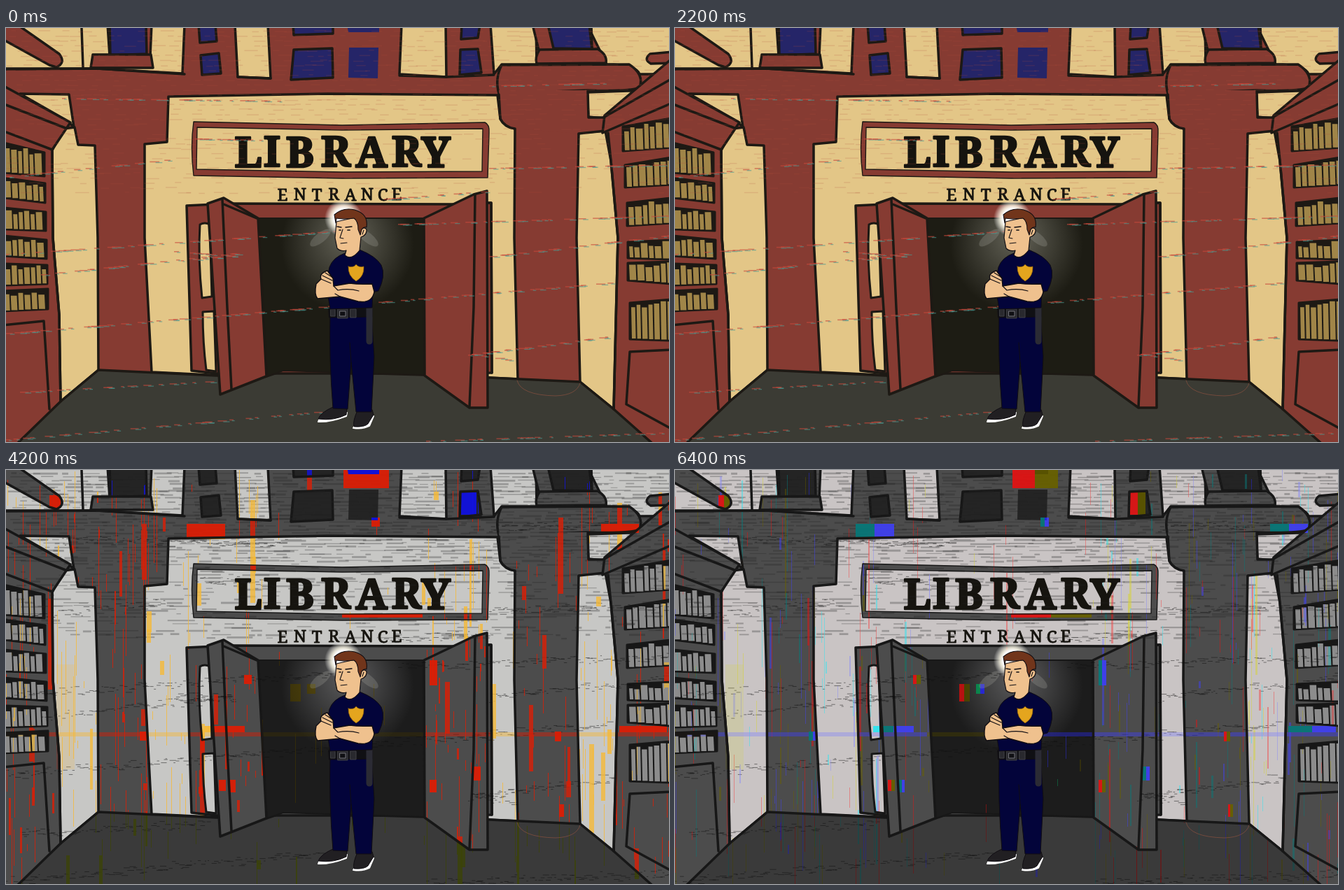
These frames come from a looping animation (947 by 592 pixels, 6.6 s). An HTML page with a canvas:

```html
<!DOCTYPE html>
<html lang="en">
<head>
<meta charset="utf-8">
<title>Library entrance</title>
<style>
  html, body { margin: 0; width: 100%; height: 100%; overflow: hidden; }
  canvas { display: block; }
</style>
</head>
<body>
<canvas id="stage" width="947" height="592"></canvas>
<script>
const W = 947, H = 592;
const stage = document.getElementById('stage').getContext('2d');
let g; // context being drawn to
let seed;

const rand = (lo = 0, hi = 1) => {
  seed = (seed * 1664525 + 1013904223) % 4294967296;
  return lo + (hi - lo) * seed / 4294967296;
};

const palette = (wall, brick, floor, dark, glass, book, glow, ink = '#1d1914') =>
  ({ wall, brick, floor, dark, glass, book, glow, ink });

const warm = palette('#e3c687', '#863b32', '#3b3b34', '#1d1c14', '#252568', '#a08548', '#5c5b50');
const grey = palette('#c7c7c8', '#4c4c4c', '#3a3a3a', '#1c1c1c', '#242424', '#8c8c8c', '#555556', '#171717');
const fire = palette('#f6b938', '#dc1e06', '#3c4408', '#3a3008', '#1212e0', '#e0b040', '#5c5010');
const red = palette('#f04848', '#e01414', '#7c0808', '#c01010', '#e01818', '#e04040', '#c01010');
const olive = palette('#d6d238', '#686000', '#444200', '#484000', '#5c5600', '#a8a030', '#585000');
const teal = palette('#30e4f0', '#087878', '#085050', '#0a8a50', '#087878', '#30b0b0', '#0a8a50');
const blue = palette('#8c8cf4', '#4040f0', '#2020a0', '#2828d8', '#2828e0', '#6060e8', '#2828d8');

function newLayer(draw) {
  const layer = document.createElement('canvas');
  layer.width = W;
  layer.height = H;
  g = layer.getContext('2d');
  g.lineJoin = g.lineCap = 'round';
  draw();
  return layer;
}

function shape(path, fill, width = 3.5, ink = '#1b1814') {
  const p = new Path2D(path);
  if (fill) { g.fillStyle = fill; g.fill(p); }
  if (width) { g.lineWidth = width; g.strokeStyle = ink; g.stroke(p); }
}

// A shelf row between x0 and x1; top and bottom edges may slope.
function bookRow(c, x0, x1, t0, t1, b0, b1) {
  shape(`M${x0} ${t0}L${x1} ${t1}L${x1} ${b1}L${x0} ${b0}Z`, c.ink, 3, c.ink);
  for (let x = x0 + 2; x < x1 - 4;) {
    const w = Math.min(rand(7, 12), x1 - x), k = (x - x0) / (x1 - x0);
    const top = t0 + (t1 - t0) * k + rand(1, 8), bottom = b0 + (b1 - b0) * k - 1;
    shape(`M${x} ${top}h${w - 2}l1 ${bottom - top}h${2 - w}Z`, c.book, 0);
    x += w;
  }
}

function letters(text, centers, y, font, weight) {
  g.font = `${font} "Noto Serif", serif`;
  g.textAlign = 'center';
  g.fillStyle = g.strokeStyle = '#16140f';
  g.lineWidth = weight;
  [...text].forEach((ch, i) => {
    const dy = y - i % 2;
    g.fillText(ch, centers[i], dy);
    g.strokeText(ch, centers[i], dy);
  });
}

function drawUpperFloor(c) {
  const wall = (p, w) => shape(p, c.wall, w, c.ink);
  const brick = (p, w) => shape(p, c.brick, w, c.ink);
  const glass = (p, w) => shape(p, c.glass, w, c.ink);
  wall('M-5 -5H255L252 65L130 58L-5 58Z');
  brick('M-5 16L-5 -5H16L76 37Q86 50 72 56L62 53Z');
  shape('M108 0L110 56', null, 3.5, c.ink);
  brick('M145 -5H208L206 40H148Z');
  glass('M148 -5H200L201 37L149 39Z');
  brick('M124 38L207 38L210 57L121 57Z');
  wall('M327 -5H374L378 72L331 70Z');
  glass('M275 -5H299L301 19L277 21Z');
  glass('M278 39L304 36L307 65L280 67Z');
  glass('M410 -5H467V8L411 10Z');
  glass('M411 31L466 29L467 71L407 74Z');
  glass('M487 -5H533V6H489Z', 0);
  glass('M490 28L532 28L531 72L489 71Z', 0);
  wall('M565 -5H628L629 70L562 66Z');
  glass('M651 -5H677L674 14L650 16Z');
  glass('M649 31L674 30L679 64L648 67Z');
  wall('M692 -5H757L758 52L708 52L697 66Z');
  wall('M830 -5H952V66H905Q900 52 858 52Z');
  brick('M752 -5H836L837 30L762 36Z');
  glass('M774 -5H833L837 30L782 29Z');
  brick('M762 31L845 30Q859 38 857 50L758 51Q755 42 762 31Z');
  brick('M952 34L920 37Q910 45 921 51L952 50Z');
  wall('M830 92L952 88V58L905 88Z', 0);
}

function drawFacade(c) {
  const wall = (p, w) => shape(p, c.wall, w, c.ink);
  const brick = (p, w) => shape(p, c.brick, w, c.ink);
  const line = (p, w) => shape(p, null, w, c.ink);

  // Cornice and wall panels
  line('M-5 59L130 58L255 66M331 70L378 72M562 68L630 70L697 67');
  wall('M232 98L460 94L702 96L706 130Q712 142 727 144L726 300L731 502L690 500L372 500L208 492L198 300L198 166L230 163Z');
  wall('M20 94L90 95L97 142L88 133Z');
  wall('M98 142L82 144L66 175L67 300L76 410L78 534L132 489L131 300L127 168L103 167Z');
  wall('M818 150L856 147L864 190L874 300L868 545L820 506L815 300Z');
  wall('M830 92L947 88L947 50L852 129L832 127Z');
  brick('M708 53L890 52Q912 66 905 85Q890 91 830 89L704 94Q698 72 708 53Z');
  brick('M704 89L831 89L832 128L855 128L852 148L818 151L727 144Q706 139 704 89Z', 0);
  line('M831 90L832 128L855 128M856 147L818 151M704 95L706 130Q712 142 727 144');

  // Floor
  shape('M132 489L300 497L372 498L396 490L596 496L690 500L820 506L868 545L930 600H10L78 534Z', c.floor, 3.5, c.ink);
  shape('M730 504Q735 525 785 526Q815 525 820 508', null, .7, '#8a5140');

  // Bookcases
  brick('M-5 82L92 135L66 174L-5 147Z');
  line('M0 110L85 143M66 174L67 300L76 410L78 534');
  bookRow(c, -3, 55, 164, 178, 207, 212);
  bookRow(c, -3, 56, 214, 222, 243, 250);
  bookRow(c, -3, 57, 257, 263, 288, 290);
  bookRow(c, -3, 58, 297, 303, 326, 330);
  bookRow(c, -3, 59, 337, 339, 368, 366);
  bookRow(c, -3, 60, 376, 373, 405, 402);
  line('M-5 425L54 419L62 545');
  brick('M952 43L855 125L852 150L952 107Z');
  line('M855 127L952 72M860 150L864 190L874 300L868 545');
  bookRow(c, 881, 950, 141, 129, 176, 171);
  bookRow(c, 884, 950, 196, 185, 228, 224);
  bookRow(c, 887, 950, 250, 243, 283, 279);
  bookRow(c, 888, 950, 306, 303, 329, 331);
  bookRow(c, 888, 950, 336, 334, 361, 366);
  bookRow(c, 891, 950, 393, 388, 445, 447);
  line('M952 460L891 463L886 538L952 574');

  // Sign
  brick('M268 134L480 139L684 135Q691 138 690 150L688 214L480 215L268 211Q263 170 268 134Z', 1.4);
  wall('M273 142L480 146L681 144L680 205L480 206L272 202Z', 1.4);
  letters('LIBRARY', [346, 380, 420, 471, 522, 572, 614], 199, 'bold 60px', 2.6);
  letters('ENTRANCE', [395, 420, 444, 468, 492, 516, 538, 558], 247, '24px', .9);
}

function drawDoor(c) {
  const brick = (p, w) => shape(p, c.brick, w, c.ink);
  brick('M258 254L320 251L640 252L693 250L694 493L600 494L300 494L265 490Z');
  shape('M277 281Q284 277 291 281L294 384L280 386Q274 330 277 281Z', c.wall, 3, c.ink);
  shape('M281 406L297 405L300 491L286 489Q281 450 281 406Z', c.wall, 3, c.ink);
  const light = g.createRadialGradient(488, 296, 12, 488, 310, 95);
  light.addColorStop(0, c.glow);
  light.addColorStop(1, c.dark);
  shape('M358 272H598V496L396 490L372 498Z', light, 2, c.ink);
  g.fillStyle = '#b4b4a83c';
  for (const [x, tilt] of [[449, .9], [517, -.9]]) {
    g.beginPath();
    g.ellipse(x, 300, 7, 18, tilt, 0, 7);
    g.fill();
  }
  brick('M288 251L311 243L360 272L372 498L306 524Z');
  shape('M309 245L316 400L322 516M311 252L358 272', null, 3.5, c.ink);
  brick('M597 272L668 238L687 233L688 543L662 543L598 497Z');
  shape('M670 238L668 400L662 542M688 250L693 250L694 493', null, 3.5, c.ink);
}

function drawScene(c) {
  seed = 7;
  g.fillStyle = c.brick;
  g.fillRect(0, 0, W, H);
  drawUpperFloor(c);
  drawFacade(c);
  drawDoor(c);
}

function drawGuard() {
  const navy = '#03043a', skin = '#efc18e', ink = '#100d12';
  const halo = g.createRadialGradient(482, 272, 14, 482, 272, 27);
  halo.addColorStop(0, '#fff');
  halo.addColorStop(.3, '#fffbe8d0');
  halo.addColorStop(1, '#fff0');
  g.fillStyle = halo;
  g.fillRect(448, 238, 72, 72);

  // Shoes, trousers, belt
  shape('M446 563Q462 564 486 555L487 550L448 558ZM496 572Q510 574 519 569L525 555L500 566Z', '#fff', 2, '#fff');
  shape('M467 542Q449 550 446 559Q468 562 486 553L487 543Z', '#211f22', 1, ink);
  shape('M502 547Q495 562 497 570Q512 571 517 566L525 553L523 546Z', '#211f22', 1, ink);
  shape('M463 408H522L526 470L522 549L500 549L493 478L488 545L467 544Q461 470 463 408Z', navy, 1, ink);
  shape('M493 478L491 450', null, 1, ink);
  shape('M461 401L523 399V413L462 414Z', '#101014', 1, ink);
  shape('M474 402h14v13h-14ZM492 402h8v12h-8ZM464 402h6v10h-6Z', '#29292e', 1, '#404046');
  shape('M477 405h8v7h-8Z', '#101014', 1, '#77777c');
  shape('M519 400L519 448', null, 9, '#2b2b34');

  // Shirt and arms
  shape('M484 322Q467 328 462 342L457 366L463 402L523 400L524 378L532 376Q543 354 536 339Q528 326 505 317Z', navy, 1, ink);
  shape('M459 347Q447 351 450 359L443 366Q440 381 445 387L477 384L503 391Q523 394 526 377L523 366Q504 367 491 365L468 369L467 358Z', skin, 1.4, ink);
  shape('M450 359L464 365M452 354L466 361M456 350L467 357M468 369L474 375Q490 372 504 376M477 384L470 380', null, 1.2, ink);
  shape('M489 341Q497 343 500 338Q504 343 511 341Q512 355 500 362Q488 354 489 341Z', '#e4a51e', .7, '#8a5c08');

  // Head
  shape('M472 277L470 300L473 315Q478 320 486 318L484 325Q493 333 505 318L507 299Q516 296 515 288Q511 284 508 288L503 270Z', skin, 1.2, ink);
  shape('M469 267Q481 256 498 260Q518 266 515 285Q511 284 508 288L506 296L503 288Q503 276 497 272Q482 274 472 272L471 279Z', '#71351b', 1.1, ink);
  shape('M473 284L479 285M485 285L494 284', null, 1.4, ink);
  shape('M476 289h2M488 289h3', null, 1.7, ink);
  shape('M481 288L477 300L482 301M478 308L487 307M511 289L509 295', null, 1.1, ink);
}

const streaks = [
  [0, 436, 860, 364], [50, 352, 325, 322], [0, 323, 470, 290], [660, 467, 865, 440],
  [540, 244, 700, 232], [270, 158, 370, 160], [0, 212, 230, 188], [690, 82, 860, 78],
  [690, 326, 947, 296], [0, 588, 450, 548], [20, 520, 290, 505], [600, 590, 947, 578],
  [240, 319, 322, 326], [250, 332, 322, 325], [665, 466, 725, 458], [665, 466, 725, 476],
  [80, 100, 400, 104], [560, 280, 947, 268], [690, 200, 947, 195]
];

// Interlaced dashes across the upper wall and along the slanted streaks.
function drawInterference(mono) {
  seed = 31;
  for (let y = 4; y < 240; y += mono ? 5 : 7) {
    g.fillStyle = mono ? '#22222248' : '#b04a3c2c';
    for (let x = rand(0, 30); x < W; x += rand(10, 45)) {
      if (y > 132 && rand() < .5) continue;
      g.fillRect(x, y + rand(-1, 1), rand(6, mono ? 40 : 20), mono ? rand(1, 3) : 1.5);
    }
  }
  for (const [x0, y0, x1, y1] of streaks) {
    for (let x = x0; x < x1; x += rand(2, mono ? 6 : 24)) {
      const y = y0 + (y1 - y0) * (x - x0) / (x1 - x0);
      if (mono) {
        g.fillStyle = '#1010107c';
        g.fillRect(x, y + rand(-4, 4) + rand(-4, 4), rand(2, 10), 1);
      } else {
        const w = rand(4, 14);
        g.fillStyle = '#c8483c9c';
        g.fillRect(x, y, w, 1.6);
        g.fillStyle = '#4a9a929c';
        g.fillRect(x + w * .6, y + 1.3, w * .7, 1.3);
      }
    }
  }
}

const blocks = [
  [482, 0, 65, 26], [258, 77, 55, 22], [480, 205, 115, 6], [850, 77, 54, 13],
  [650, 30, 22, 34], [283, 366, 58, 9], [62, 36, 16, 18], [876, 366, 68, 9],
  [340, 293, 11, 13], [605, 272, 11, 36], [406, 306, 15, 25], [430, 306, 12, 14],
  [304, 443, 10, 16], [320, 443, 8, 18], [605, 443, 10, 18], [668, 424, 10, 20],
  [790, 478, 7, 18], [191, 374, 12, 13], [784, 374, 9, 14], [522, 68, 12, 13]
];
const clusters = [18, 82, 145, 190, 215, 270, 345, 610, 630, 675, 745, 805, 840, 885, 940];

// Thin columns and blocks copied from recoloured versions of the scene.
function drawGlitch({ tints, wall, count, columns, maxWidth, columnAlpha, blockAlpha, start }) {
  const layers = tints.map(t => newLayer(() => drawScene(t)));
  return newLayer(() => {
    const copy = (i, x, y, w, h, alpha) => {
      g.globalAlpha = alpha;
      g.drawImage(layers[i % layers.length], x, y, w, h, x, y, w, h);
      g.globalAlpha = 1;
    };
    drawScene({ ...grey, wall });
    drawInterference(true);
    seed = start;
    for (let i = 0; i < columns; i++) {
      const near = clusters[Math.floor(rand(0, clusters.length))] + rand(-22, 22);
      const x = Math.floor(rand() < .75 ? near : rand(0, W));
      const y = Math.floor(rand(0, 560)), w = rand() < .2 ? Math.ceil(rand(1, maxWidth)) : 1;
      const h = Math.floor(Math.min(10 + 170 * rand() * rand(), H - y));
      copy(i, Math.max(0, Math.min(x, W - w)), y, w, h, columnAlpha);
    }
    copy(1, 72, 278, 26, 150, blockAlpha * .2);
    copy(layers.length - 1, 0, 375, 360, 6, .45);
    copy(1, 360, 375, 85, 6, .45);
    copy(layers.length - 1, 520, 375, W - 520, 6, .45);
    blocks.slice(0, count).forEach(([x, y, w, h], i) => {
      const half = w >> 1;
      copy(i % 2 * 2, x, y, half, h, blockAlpha);
      copy(i % 2 * 2 + 1, x + half, y, w - half, h, blockAlpha);
    });
    drawGuard();
  });
}

const calm = newLayer(() => {
  drawScene(warm);
  drawInterference(false);
  drawGuard();
});
const mixed = [red, olive, teal, blue];
const glitches = [
  { tints: mixed, wall: '#c7c7c8', count: 5, columns: 700, maxWidth: 2, columnAlpha: .3, blockAlpha: .55, start: 11 },
  { tints: [fire], wall: '#c7c7c5', count: 20, columns: 380, maxWidth: 7, columnAlpha: .8, blockAlpha: .95, start: 23 },
  { tints: mixed, wall: '#c9c4c4', count: 20, columns: 420, maxWidth: 3, columnAlpha: .5, blockAlpha: .95, start: 47 }
].map(drawGlitch);

// Two calm seconds, then a 200 ms glitch, with three glitches in turn.
function frame() {
  const t = performance.now() % 6600;
  stage.drawImage(t % 2200 < 2000 ? calm : glitches[Math.floor(t / 2200)], 0, 0);
  requestAnimationFrame(frame);
}
frame();
</script>
</body>
</html>
```
